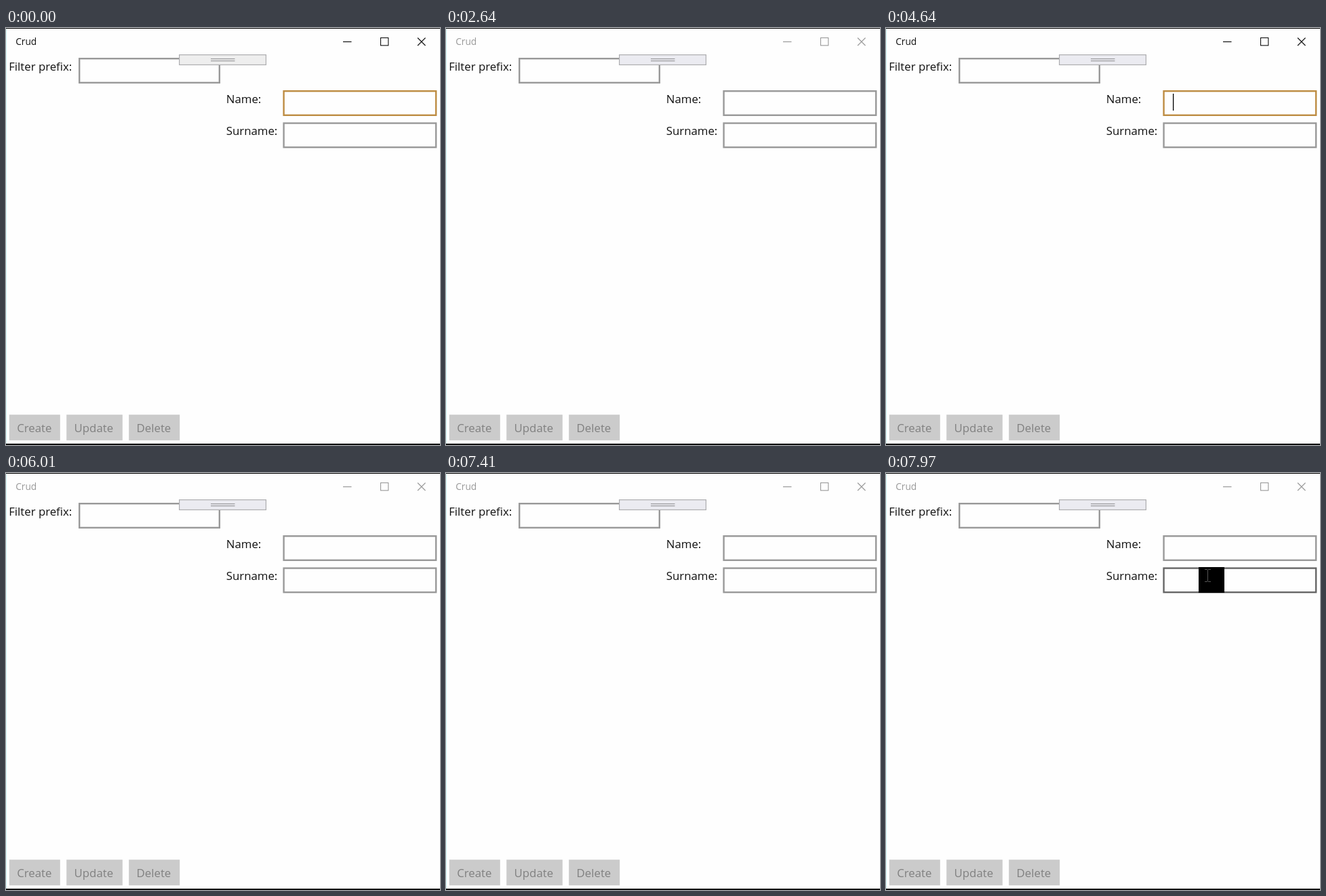
An HTML page with a canvas that plays this animation: 640 by 616 pixels, repeating every 8000 ms.

```html
<!DOCTYPE html>
<html lang="en">
<head>
<meta charset="utf-8">
<title>Crud</title>
<style>
html, body { margin: 0; width: 100%; height: 100%; overflow: hidden; background: #fff; }
canvas { display: block; }
</style>
</head>
<body>
<canvas id="stage" width="640" height="616"></canvas>
<script>
const ctx = document.getElementById('stage').getContext('2d');
const LOOP = 8000;
const FONT = '"Open Sans", "Noto Sans", sans-serif';
const within = (t, a, b) => t >= a && t < b;

function rect(x, y, w, h, color) {
  ctx.fillStyle = color;
  ctx.fillRect(x, y, w, h);
}

function text(s, x, y, size, color) {
  ctx.font = `${size}px ${FONT}`;
  ctx.fillStyle = color;
  ctx.fillText(s, x, y);
}

function frame(x, y, w, h, line, color, fill) {
  rect(x, y, w, h, color);
  rect(x + line, y + line, w - 2 * line, h - 2 * line, fill);
}

function field(x, y, w, color) {
  frame(x, y, w, 38, 2.4, color, '#fefefe');
}

function button(label, x, w) {
  rect(x, 571.2, w, 38, '#cbcbcb');
  text(label, x + 11.4, 597.3, 16.8, '#808080');
}

function titleBar(active) {
  const color = active ? '#111' : '#999';
  text('Crud', 14.2, 25, 13.7, color);
  rect(497, 19.8, 12.5, 1.2, color);
  ctx.strokeStyle = color;
  ctx.lineWidth = 1.1;
  ctx.strokeRect(552.5, 14.5, 11.3, 11.3);
  ctx.beginPath();
  ctx.moveTo(607, 14.5);
  ctx.lineTo(618.5, 26);
  ctx.moveTo(618.5, 14.5);
  ctx.lineTo(607, 26);
  ctx.stroke();
}

function grip(t) {
  frame(255, 39, 129, 16, 1.2, '#adadb0', t < 370 ? '#eeeeee' : '#ebebf1');
  rect(302, 45, 35.5, 1.2, '#99999c');
  rect(302, 48, 35.5, 1.2, '#99999c');
}

// Hot spot of the pointer, or null while it is outside the window
function pointer(t) {
  const s = Math.floor((t + 5) / (100 / 3)) * (100 / 3);
  if (within(t, 7270, 7410)) {
    const u = Math.min(1, Math.max(0, (s - 7266) / 100));
    const e = 1 - (1 - u) ** 2;
    return { x: 170 - 163 * e, y: 576 - 139 * e };
  }
  if (within(t, 7570, 7670)) {
    const u = Math.max(0, (s - 7566) / 100);
    return { x: 15 + 193 * u, y: 331 - 143 * u * (1.25 - 0.25 * u) };
  }
  if (t >= 7670) {
    const u = Math.min(1, Math.max(0, (s - 7666) / 300));
    const e = 1 - (1 - u) ** 2;
    return { x: 208 + 266 * e, y: 188 - 37 * e };
  }
  return null;
}

function arrow(x, y) {
  rect(x, y, 38, 38, '#000');
  ctx.fillStyle = '#fff';
  ctx.beginPath();
  [[1, 1.5], [1, 19], [5, 15.2], [8.2, 22], [11, 20.8], [8, 14], [13.5, 13.8]]
    .forEach(([dx, dy]) => ctx.lineTo(x + dx, y + dy));
  ctx.fill();
}

function beam(x, y) {
  rect(x - 13, y - 12, 38, 38, '#000');
  const c = '#555';
  rect(x, y - 8, 1, 17, c);
  for (const dy of [-9, 9]) {
    rect(x - 4, y + dy, 4, 1, c);
    rect(x + 1, y + dy, 4, 1, c);
  }
}

function draw(t) {
  const active = t < 2600 || within(t, 4600, 5670);
  const caret = active && t >= 370;
  const p = pointer(t);
  const hover = p && p.x >= 409 && p.y >= 139 && p.y < 177;

  rect(0, 0, 640, 616, '#fefefe');
  rect(0, 1, 1, 613, '#d0f8fa');
  rect(0, 0, 640, 1, '#000');
  rect(0, 614, 640, 2, '#000');
  titleBar(active);

  text('Filter prefix:', 4.2, 63, 16.8, '#111');
  text('Name:', 324.8, 110.5, 16.8, '#111');
  text('Surname:', 324.8, 158, 16.8, '#111');
  field(107, 44, 209, '#999');
  field(408.4, 92, 226.9, active ? '#bd8c42' : '#999');
  field(408.4, 139.4, 226.9, hover ? '#666' : '#999');
  if (caret) rect(423, 97, 1.3, 25, '#000');
  grip(t);

  button('Create', 4.8, 75);
  button('Update', 89.2, 82.6);
  button('Delete', 181.2, 75);

  if (p) (hover ? beam : arrow)(Math.round(p.x), Math.round(p.y));
}

ctx.textRendering = 'optimizeSpeed';
const start = performance.now();
function tick() {
  draw((performance.now() - start) % LOOP);
  requestAnimationFrame(tick);
}
tick();
</script>
</body>
</html>
```
